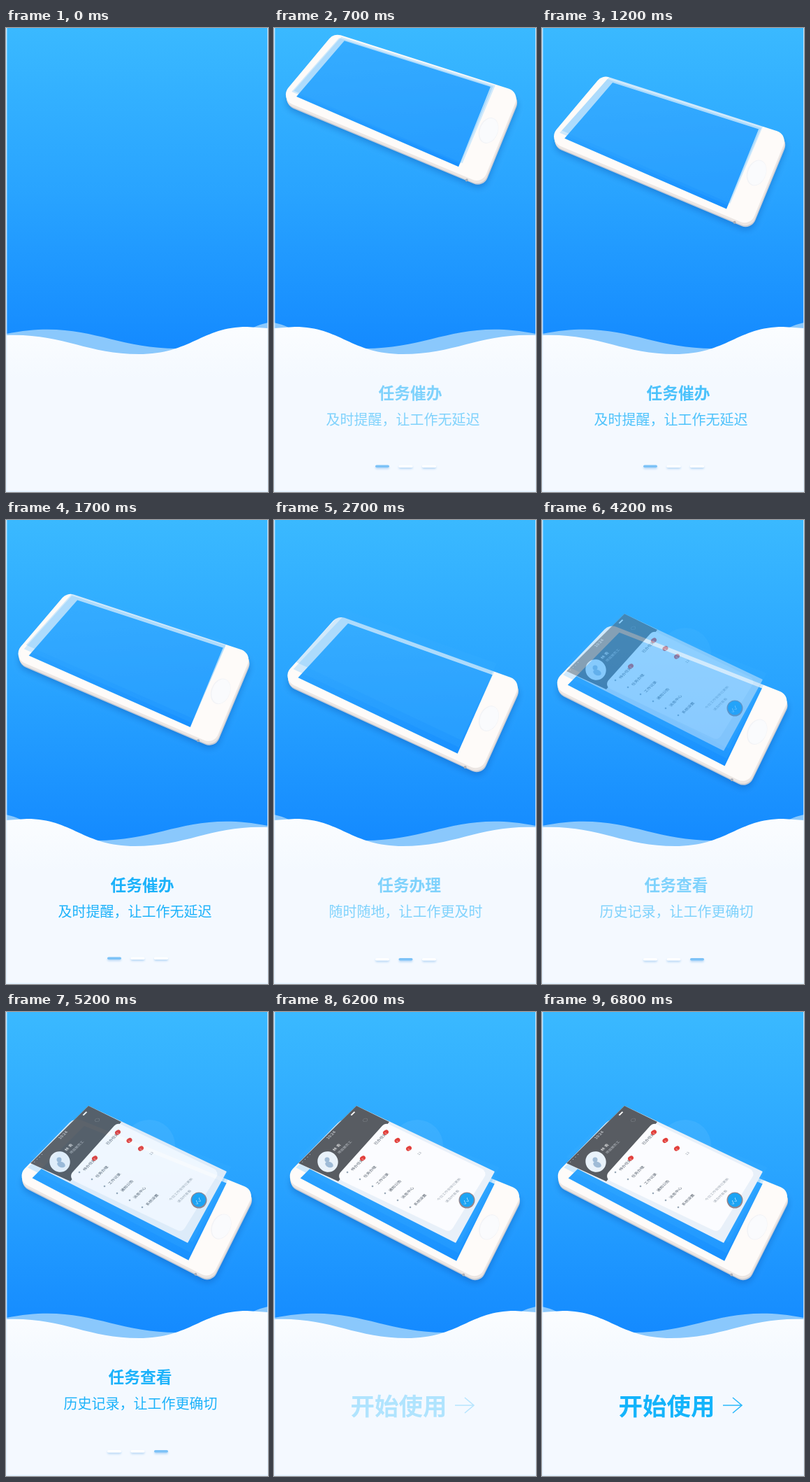
Recreate the animation shown at these times as an HTML page with a canvas. Size 375 by 663 pixels, loop 7 s.

```html
<!DOCTYPE html>
<html lang="zh">
<head>
<meta charset="utf-8">
<style>
html, body { margin: 0; width: 100%; height: 100%; overflow: hidden; background: #f4f9ff; }
canvas { display: block; width: 375px; height: 663px; }
</style>
</head>
<body>
<canvas id="stage"></canvas>
<script>
const W = 375, H = 663, LOOP = 7000;
const FONT = '"Noto Sans CJK SC", "Noto Sans CJK", sans-serif';
const INK = '#1cb2fa';
const dpr = window.devicePixelRatio || 1;

const PAGES = [
  { from: 2, title: '任务催办', sub: '及时提醒，让工作无延迟' },
  { from: 6, title: '任务办理', sub: '随时随地，让工作更及时' },
  { from: 9, title: '任务查看', sub: '历史记录，让工作更确切' }
];
const SHEET_STEP = 10, BUTTON_STEP = 14;

// Resting outlines
const FACE = [[99, 152], [357, 258], [293, 384], [13, 239]];
const SCREEN = [[113, 164], [316, 247], [261, 357], [38, 238]];
const LAYER = [[104, 160], [318, 247], [262, 354], [30, 231]];

function setup(canvas) {
  canvas.width = W * dpr;
  canvas.height = H * dpr;
  const c = canvas.getContext('2d');
  c.scale(dpr, dpr);
  c.textBaseline = 'middle';
  return c;
}

let ctx;
const mid = (p, q) => [(p[0] + q[0]) / 2, (p[1] + q[1]) / 2];
const fade = (n, base) => Math.min(1, base + .24 * n);

// The picture moves in steps: two short ones, then slow, then quick again.
function stepAt(t) {
  if (t < 200) return Math.floor(t / 100);
  if (t < 6200) return 2 + Math.floor((t - 200) / 500);
  return BUTTON_STEP + Math.floor((t - 6200) / 200);
}

function poly(pts, fill, r = 0, dx = 0, dy = 0) {
  const moved = pts.map(([x, y]) => [x + dx, y + dy]);
  ctx.beginPath();
  ctx.moveTo(...mid(moved.at(-1), moved[0]));
  moved.forEach((p, i) => ctx.arcTo(...p, ...moved[(i + 1) % moved.length], r));
  ctx.closePath();
  ctx.fillStyle = fill;
  ctx.fill();
}

function disc(x, y, rx, fill, ry = rx, turn = 0) {
  ctx.beginPath();
  ctx.ellipse(x, y, rx, ry, turn, 0, Math.PI * 2);
  ctx.fillStyle = fill;
  ctx.fill();
}

function text(str, x, y, size, weight, fill, align = 'center') {
  ctx.font = `${weight} ${size}px ${FONT}`;
  ctx.textAlign = align;
  ctx.fillStyle = fill;
  ctx.fillText(str, x, y);
}

// Small text lying on the tilted sheet.
function label(str, x, y, size, fill) {
  ctx.save();
  ctx.transform(.72, -.7, .8, .42, x, y);
  text(str, 0, 0, size, 500, fill, 'left');
  ctx.restore();
}

function vertical(y0, y1, ...colors) {
  const g = ctx.createLinearGradient(0, y0, 0, y1);
  colors.forEach((c, i) => g.addColorStop(i / (colors.length - 1), c));
  return g;
}

function shadow(color, blur, y) {
  ctx.shadowColor = color;
  ctx.shadowBlur = blur * dpr;
  ctx.shadowOffsetY = y * dpr;
}

function drawWaves(mirrored) {
  ctx.save();
  if (mirrored) ctx.transform(-1, 0, 0, 1, W, 0);
  const edge = ` L${W},${H} L0,${H} Z`;
  ctx.fillStyle = '#8ac8fc';
  ctx.fill(new Path2D('M0,437 C110,415 150,458 245,458 S330,430 375,421' + edge));
  ctx.fillStyle = vertical(425, 500, '#fbfdff', '#f4f9ff');
  ctx.fill(new Path2D('M0,439 C80,436 115,466 190,466 S280,427 345,427 L375,429' + edge));
  ctx.restore();
}

// The phone rises into place while a small rotation settles.
function drawPhone(left) {
  const tilt = 1 - Math.exp(-left / 30);
  const lift = 24 * Math.exp(-left / 60);

  ctx.save();
  ctx.translate(290, 320 - left);
  ctx.rotate(-.083 * tilt);
  ctx.translate(-290, -320);

  ctx.save();
  shadow('rgba(10,80,170,.4)', 10, 4);
  poly(FACE, '#c5cbd6', 15, 1, 6);
  ctx.restore();
  poly(FACE, '#ece6e3', 15, .5, 4);
  poly(FACE, '#fefbf9', 15);
  poly(SCREEN, vertical(164, 357, '#33abff', '#1890ff'));
  for (const k of [.35, 1]) poly(LAYER, 'rgba(56,172,255,.23)', 0, 5 * k, -lift * k);

  disc(308, 309, 13.5, '#f2f3f6', 19, .45);
  disc(308.5, 309, 12.5, '#fafbfd', 18, .45);
  disc(271, 377, 2, '#a9adb6');
  ctx.restore();
}

function makeSheet() {
  const canvas = document.createElement('canvas');
  ctx = setup(canvas);
  disc(205, 191, 37, 'rgba(130,205,255,.16)');
  poly([[118, 134], [316, 228], [260, 330], [35, 216]], '#e8f0f9', 1);
  poly([[118, 134], [165, 157], [92, 242], [35, 216]], '#585c62');
  poly([[159, 158], [306, 228], [252, 315], [88, 237]], '#fbfcff', 8);

  label('10:24', 76, 181, 6, '#e8ecf0');
  label('••••', 39, 216, 5, '#e8ecf0');
  label('▬', 109, 147, 7, '#fff');
  label('○', 128, 157, 7, '#aab0b7');
  disc(77, 214, 14.5, '#e9f2fa', 15, -.7);
  disc(76, 211, 3.5, '#9fbbd6');
  disc(79, 218, 6, '#9fbbd6', 4, .4);
  label('林 青', 85, 198, 6, '#fff');
  label('项目部员工', 92, 202, 5, '#c9ced4');

  ['待办任务', '任务办理', '工作记录', '通知公告', '消息中心', '系统设置'].forEach((s, i) => {
    const x = 111 + 18 * i, y = 226 + 10 * i;
    label(s, x, y, 5.6, '#4a5560');
    disc(x - 6, y + 3, 1.3, '#9aa9b8');
  });
  label('已办任务', 144, 189, 5.6, '#4a5560');

  const badge = (x, y) => {
    disc(x, y, 4.2, '#e2403c', 3.2, -.5);
    label('3', x - 1, y + 2, 4, '#fff');
  };
  badge(127, 209);
  for (let i = 0; i < 3; i++) badge(160 + 16.5 * i, 172 + 11.5 * i);
  label('12', 206, 204, 5, '#8b95a0');
  label('今日工作安排已更新', 234, 269, 5, '#99a2ac');
  label('请及时查看', 246, 272, 5, '#99a2ac');

  disc(276, 269, 11.5, '#8e8590');
  disc(276, 268.5, 10, '#1ba4f4');
  label('✓✓', 271, 274, 8, '#e6f6ff');
  return canvas;
}

function drawDots(active) {
  for (let i = 0; i < PAGES.length; i++) {
    ctx.save();
    shadow('rgba(120,180,235,.5)', 3, 2);
    ctx.beginPath();
    ctx.roundRect(145 + i * 33.5, active ? 626 : 624.5, 20, 3.6, 1.8);
    ctx.fillStyle = i === active ? '#7cc2f7' : '#fff';
    ctx.fill();
    ctx.restore();
  }
}

function drawPage(step) {
  const n = PAGES.findLastIndex(p => step >= p.from);
  if (n < 0) return;
  const { from, title, sub } = PAGES[n];
  drawDots(n);
  ctx.globalAlpha = fade(step - from, .3);
  text(title, 195 - 1.5 * n, 521.5, 22.8, 700, INK);
  text(sub, 184.5 + 4 * n, 559, 20, 400, INK);
}

function drawButton(alpha) {
  ctx.globalAlpha = alpha;
  text('开始使用', 178.5, 562.5, 34.5, 700, '#14b4fb');
  ctx.strokeStyle = '#2bb9fb';
  ctx.lineWidth = 1.6;
  ctx.stroke(new Path2D('M259,562 H286 M273,551 L286,562 L273,573'));
}

function render(step) {
  ctx.globalAlpha = 1;
  ctx.fillStyle = vertical(0, 460, '#3ab9ff', '#29a4ff', '#148aff');
  ctx.fillRect(0, 0, W, H);

  if (step > 0) drawPhone(161 * Math.pow(.625, Math.min(step, 13) - 3));
  if (step >= SHEET_STEP) {
    ctx.globalAlpha = fade(step - SHEET_STEP, .46);
    ctx.drawImage(sheet, 0, 0, W, H);
    ctx.globalAlpha = 1;
  }
  drawWaves(step % 2 === 1);

  ctx.fillStyle = 'rgba(222,240,255,.85)';
  ctx.fillRect(0, 0, 1.4, H);
  ctx.fillRect(W - 1, 0, 1, H);
  ctx.fillRect(0, H - 1.5, W, 1.5);

  if (step >= BUTTON_STEP) drawButton(fade(step - BUTTON_STEP, .3));
  else drawPage(step);
}

const sheet = makeSheet();
ctx = setup(document.getElementById('stage'));
const start = performance.now();
function tick() {
  render(stepAt((performance.now() - start) % LOOP));
  requestAnimationFrame(tick);
}
tick();
</script>
</body>
</html>
```
